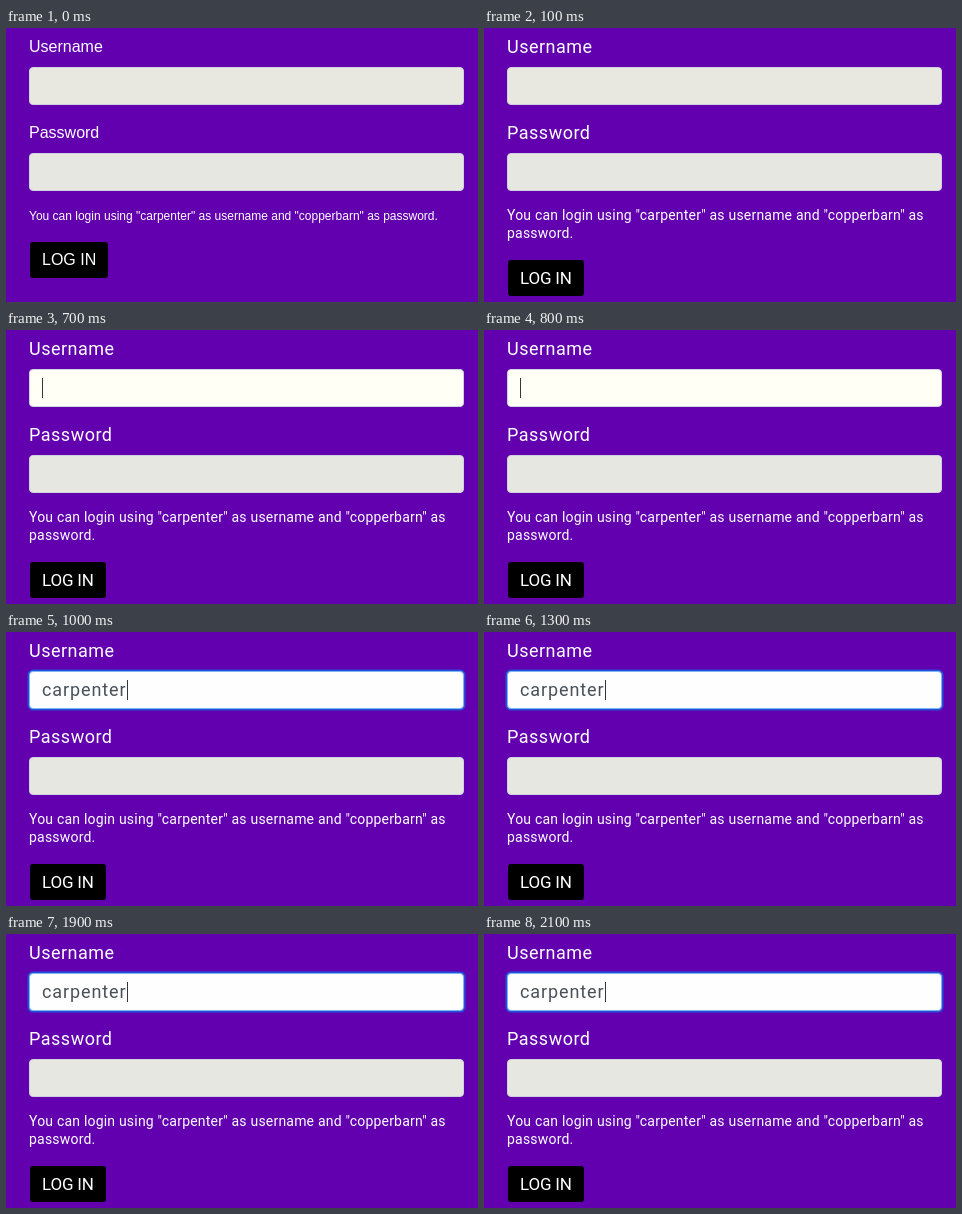
Recreate the animation shown at these times as an HTML page. Size 472 by 274 pixels, loop 2200 ms.

```html
<!DOCTYPE html>
<html lang="en">
<head>
<meta charset="utf-8">
<title>Login form</title>
<style>
  html, body { margin: 0; width: 100%; height: 100%; overflow: hidden; background: #6200b0; }
  svg { display: block; width: 472px; height: 274px; }
  text { fill: #fff; white-space: pre; }
  .fallback { font: 16px "Liberation Sans", Arial, sans-serif; }
  .fallback .hint { font-size: 12px; }
  .loaded { font: 18px Roboto, sans-serif; letter-spacing: .5px; }
  .loaded .hint { font-size: 14px; letter-spacing: .2px; }
  .loaded .action { font-size: 17px; letter-spacing: -.2px; }
  #typed { font: 18px Roboto, sans-serif; letter-spacing: .9px; fill: #495057; }
  .field { stroke: #cfd2dc; }
</style>
</head>
<body>
<svg viewBox="0 0 472 274">
  <rect width="472" height="274" fill="#6200b0"/>
  <rect id="ring" x="22.5" y="38.5" width="436" height="39" rx="4.5" fill="none" stroke="#2450d8" stroke-width="2"/>
  <rect id="user" class="field" x="23.5" y="39.5" width="434" height="37" rx="3.5"/>
  <rect class="field" x="23.5" y="125.5" width="434" height="37" rx="3.5" fill="#e6e7e1"/>
  <text id="typed" x="36" y="64">carpenter</text>
  <rect id="caret" y="48" width="1" height="20" fill="#33373c"/>

  <g id="before" class="fallback">
    <text x="23" y="24">Username</text>
    <text x="23" y="110">Password</text>
    <text class="hint" x="23" y="192">You can login using "carpenter" as username and "copperbarn" as password.</text>
    <rect x="24" y="214" width="78" height="36" rx="3"/>
    <text x="36" y="237">LOG IN</text>
  </g>

  <g id="after" class="loaded">
    <text x="23" y="25">Username</text>
    <text x="23" y="111">Password</text>
    <text class="hint" x="23" y="192">You can login using "carpenter" as username and "copperbarn" as</text>
    <text class="hint" x="23" y="210">password.</text>
    <rect x="24" y="232" width="76" height="36" rx="3"/>
    <text class="action" x="36" y="256">LOG IN</text>
  </g>
</svg>
<script>
  const LOOP = 2200, FONT_AT = 100, FOCUS_AT = 700, TYPE_AT = 900, BLINK = 500;
  const $ = id => document.getElementById(id);
  const show = (id, on) => $(id).setAttribute('visibility', on ? 'visible' : 'hidden');
  const start = performance.now();

  function draw(now) {
    const t = Math.floor(Math.max(0, now - start) % LOOP / 100) * 100;
    const focused = t >= FOCUS_AT, typed = t >= TYPE_AT;

    show('before', t < FONT_AT);
    show('after', t >= FONT_AT);
    show('typed', typed);
    show('ring', typed);
    $('user').setAttribute('fill', typed ? '#fefefe' : focused ? '#fffff6' : '#e8e8e1');
    $('user').style.stroke = typed ? '#7db4f5' : '';

    // Each keystroke or focus restarts the caret's blink.
    const since = t - (typed ? TYPE_AT : FOCUS_AT);
    show('caret', focused && Math.floor(since / BLINK) % 2 === 0);
    $('caret').setAttribute('x', typed ? 121 : 36);
    requestAnimationFrame(draw);
  }
  draw(start);
</script>
</body>
</html>
```
